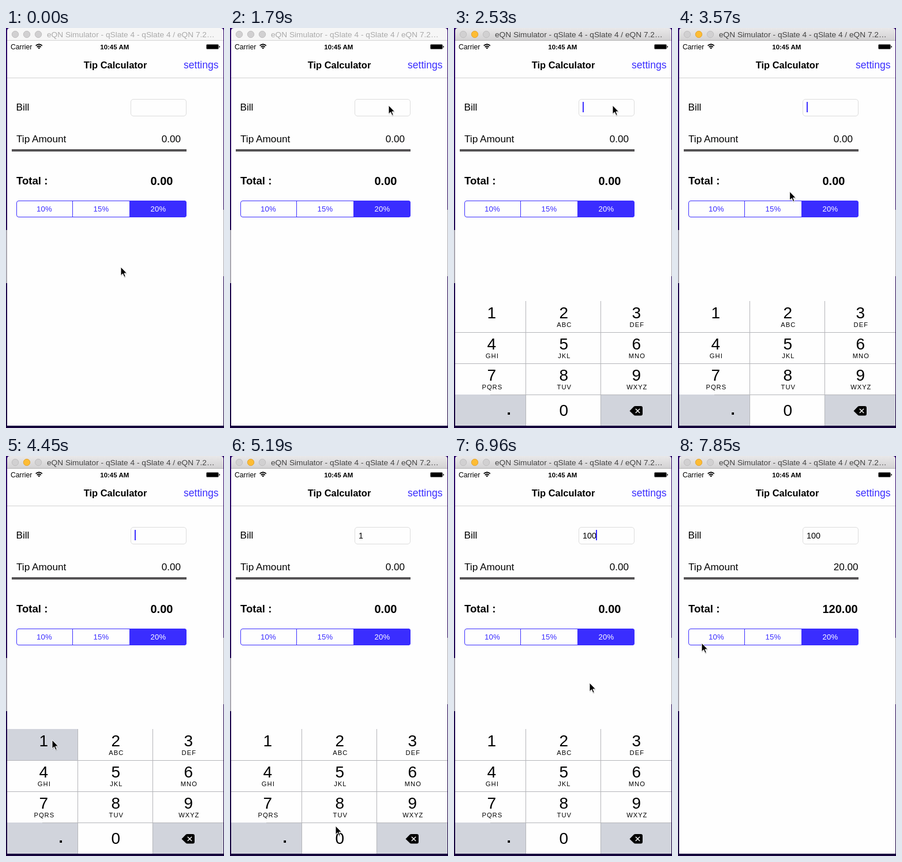
An HTML page for the animation above (7990 ms loop, 378 by 693 pixels).

```html
<!DOCTYPE html>
<html lang="en">
<head>
<meta charset="utf-8">
<title>Tip Calculator</title>
<style>
html, body { margin: 0; width: 100%; height: 100%; overflow: hidden; background: #270062; }
svg { display: block; width: 378px; height: 693px; font-family: "Liberation Sans", Arial, sans-serif; }
text { white-space: pre; }
.mid { text-anchor: middle; }
.b { font-weight: 700; }
.num { font-size: 28px; text-anchor: middle; }
.abc { font-size: 11.2px; letter-spacing: 1px; text-anchor: middle; }
.seg { font-size: 13.2px; letter-spacing: .2px; text-anchor: middle; fill: #3a2dff; }
</style>
</head>
<body>
<svg viewBox="0 0 378 693">
  <defs>
    <linearGradient id="bar" x2="0" y2="1">
      <stop stop-color="#e9e8e9"/><stop offset="1" stop-color="#d2d1d2"/>
    </linearGradient>
    <linearGradient id="edge" x2="0" y2="1">
      <stop stop-color="#2b0069"/><stop offset="1" stop-color="#16003d"/>
    </linearGradient>
    <clipPath id="screen"><rect x="2" y="22" width="375" height="667"/></clipPath>
  </defs>

  <rect width="378" height="693" fill="url(#edge)"/>
  <rect y="350" width="2" height="92" fill="#aaa8b0"/>
  <rect x="377" y="315" width="1" height="115" fill="#aaa8b0"/>
  <rect x="2" y="22" width="375" height="667" fill="#fefefe"/>

  <path id="titlebar" d="M2 22V5Q2 0 7 0H372Q377 0 377 5V22Z"/>
  <path id="barline" d="M2 21.5H377"/>
  <g id="lights"></g>
  <text id="caption" x="71" y="16" font-size="13.7">eQN Simulator - qSlate 4 - qSlate 4 / eQN 7.2…</text>

  <text x="8" y="37" font-size="12.2">Carrier</text>
  <g fill="none" stroke="#000" stroke-width="1.8">
    <path d="M51.6 30.6Q57.2 25.8 62.8 30.6M53.7 33Q57.2 30 60.7 33"/>
    <path d="M55.2 34.2Q57.2 32.6 59.2 34.2L57.2 36.6Z" fill="#000" stroke="none"/>
  </g>
  <text x="188.3" y="36.5" class="mid b" font-size="11.5">10:45 AM</text>
  <rect x="347.5" y="28.5" width="21" height="8" rx="1.5" stroke="#777"/>
  <path d="M369.5 30.8Q371 31 371 32.5T369.5 34.2Z"/>

  <text x="189.5" y="70" class="mid b" font-size="16.5">Tip Calculator</text>
  <text x="308" y="70" font-size="17.6" fill="#3a2dff">settings</text>
  <path d="M2 86.5H377" stroke="#d2d2d2"/>

  <text x="17.5" y="142.5" font-size="17.2">Bill</text>
  <rect x="216.5" y="123.5" width="96" height="29" rx="4.5" fill="#fefefe" stroke="#dcdcdc"/>
  <text id="bill" x="223" y="143" font-size="14.3"></text>
  <rect id="caret" y="128" width="2" height="18" fill="#3a2dff"/>

  <text x="18" y="197.5" font-size="17.2">Tip Amount</text>
  <text id="tip" x="269.8" y="197.5" font-size="17.1"></text>
  <rect x="10" y="210" width="303" height="4" fill="#555355"/>
  <text x="18" y="270.5" class="b" font-size="18.6">Total :</text>
  <text id="total" x="250.5" y="272" class="b" font-size="20"></text>

  <rect x="18.5" y="299.5" width="294" height="28" rx="3.5" fill="#fefefe" stroke="#3a2dff"/>
  <path d="M115.5 299V328" stroke="#3a2dff"/>
  <path d="M214 299H309Q313 299 313 303V324Q313 328 309 328H214Z" fill="#3a2dff"/>
  <text x="66.4" y="318" class="seg">10%</text>
  <text x="165" y="318" class="seg">15%</text>
  <text x="264" y="318" class="seg" style="fill:#fff">20%</text>

  <g clip-path="url(#screen)"><g id="pad"></g></g>

  <g id="mouse">
    <path d="M0 0V15.2L3.5 12L6 17.6L8.5 16.5L6.1 11H10.8Z" transform="translate(.3 1.4)" opacity=".2"/>
    <path d="M0 0V15L3.5 11.8L6 17.4L8.3 16.4L5.9 10.9H10.6Z" stroke="#fff"/>
  </g>
</svg>
<script>
const LOOP = 7990, FIRST = 1040, STEP = 147.8;   // the screen refreshes once per STEP
const PAD_TOP = 473, ROW = 54;
const GREY = "#d1d4dc", WHITE = "#fefefe";
const $ = id => document.getElementById(id);
const clamp = v => Math.min(1, Math.max(0, v));
const set = (el, attrs) => { for (const k in attrs) el.setAttribute(k, attrs[k]); };

function add(parent, tag, attrs, text = "") {
  const el = document.createElementNS("http://www.w3.org/2000/svg", tag);
  set(el, attrs);
  el.textContent = text;
  return parent.appendChild(el);
}

const pad = $("pad"), cells = {};
const letters = ["", "ABC", "DEF", "GHI", "JKL", "MNO", "PQRS", "TUV", "WXYZ"];

[..."123456789.0<"].forEach((key, i) => {
  const col = i % 3, row = Math.floor(i / 3);
  const x = 2 + col * 126, y = PAD_TOP + row * ROW, mid = 65.3 + col * 126;
  const isDigit = key >= "0" && key <= "9";
  cells[key] = add(pad, "rect", { x, y, width: 126, height: ROW, fill: isDigit ? WHITE : GREY });
  const cx = col ? mid - 1 : mid;
  if (isDigit) add(pad, "text", { x: cx, y: y + (row < 3 ? 30 : 37), class: "num" }, key);
  if (letters[i]) add(pad, "text", { x: cx + 1, y: y + 45, class: "abc" }, letters[i]);
});
// the middle column is a little wider than the left one
for (const [k, x, width] of [["0", 125, 130], ["<", 255, 122]]) set(cells[k], { x, width });
set(cells["1"], { width: 123 });
add(pad, "rect", { x: 93.2, y: 666, width: 3.8, height: 4 });
add(pad, "path", {
  d: "M2 527.5H377M2 581.5H377M63 635.5H377M124.5 473V689M254.5 473V689",
  stroke: "#b4b5b9"
});
add(pad, "path", { d: "M304.5 663.5L311.5 656.3Q312.7 655 314.5 655H324Q327 655 327 658V668.5Q327 671.5 324 671.5H314.5Q312.7 671.5 311.5 670.3Z" });
add(pad, "path", { d: "M314.8 659.7l7.4 7.4m0-7.4l-7.4 7.4", stroke: "#fff", "stroke-width": 1.4 });

const lights = [16, 36, 56].map(cx => add($("lights"), "circle", { cx, cy: 11, r: 5.7 }));

// events, in steps
const WAKE = 6, FOCUS = 7, DONE = 41;
const presses = [[23, "1"], [30, "0"], [32, "0"]];
const moves = [   // from step, to step, x, y
  [-1, 1, 232, 189], [2, 5, 275, 134], [13, 22, 80, 492], [24, 29, 195, 658],
  [33, 37, 277, 430], [37, 40, 235, 393], [42, 46, 41, 324]
];

function mouseAt(n) {
  let x = 199, y = 414;
  for (const [from, to, x1, y1] of moves) {
    const p = clamp((n - from) / (to - from)), e = p * p * (3 - 2 * p);
    x += (x1 - x) * e;
    y += (y1 - y) * e;
  }
  return `translate(${x} ${y})`;
}

const slide = (n, from) => 1 - (1 - clamp((n - from + .2) / 3)) ** 3;

function caretAt(n) {
  if (n < FOCUS || n >= DONE) return 0;
  const since = n - presses.reduce((last, [at]) => at <= n ? at : last, FOCUS);
  return since < 4 ? 1 : clamp(.72 + Math.cos((since - 2) / 7 * 2 * Math.PI));
}

function draw(t) {
  const n = Math.max(-1, Math.floor((t - FIRST) / STEP));
  const active = n >= WAKE, done = n >= DONE;

  set($("titlebar"), { fill: active ? "url(#bar)" : "#f6f6f6" });
  set($("barline"), { stroke: active ? "#b3b2b3" : "#d4d4d4" });
  set($("caption"), { fill: active ? "#444" : "#aaa" });
  lights.forEach((light, i) => {
    const amber = active && i === 1;
    set(light, { fill: amber ? "#fdbc34" : "#d1d0d1", stroke: amber ? "#e2a433" : "#c0bfc0" });
  });

  const text = presses.filter(([at]) => at < n).map(([, key]) => key).join("");
  const held = presses.find(([at]) => at === n)?.[1];
  for (const key of "10") set(cells[key], { fill: key === held ? GREY : WHITE });
  const shown = slide(n, FOCUS) - slide(n, DONE);
  set(pad, { transform: `translate(0 ${(1 - shown) * 4 * ROW})` });

  $("bill").textContent = text;
  set($("caret"), { x: 223 + Math.floor(text.length * 7.8), opacity: caretAt(n) });
  $("tip").textContent = done ? "20.00" : "0.00";
  $("total").textContent = done ? "120.00" : "0.00";
  set($("mouse"), { transform: mouseAt(n) });
}

const start = performance.now();
function tick(now) {
  draw(Math.max(0, now - start) % LOOP);
  requestAnimationFrame(tick);
}
draw(0);
requestAnimationFrame(tick);
</script>
</body>
</html>
```
